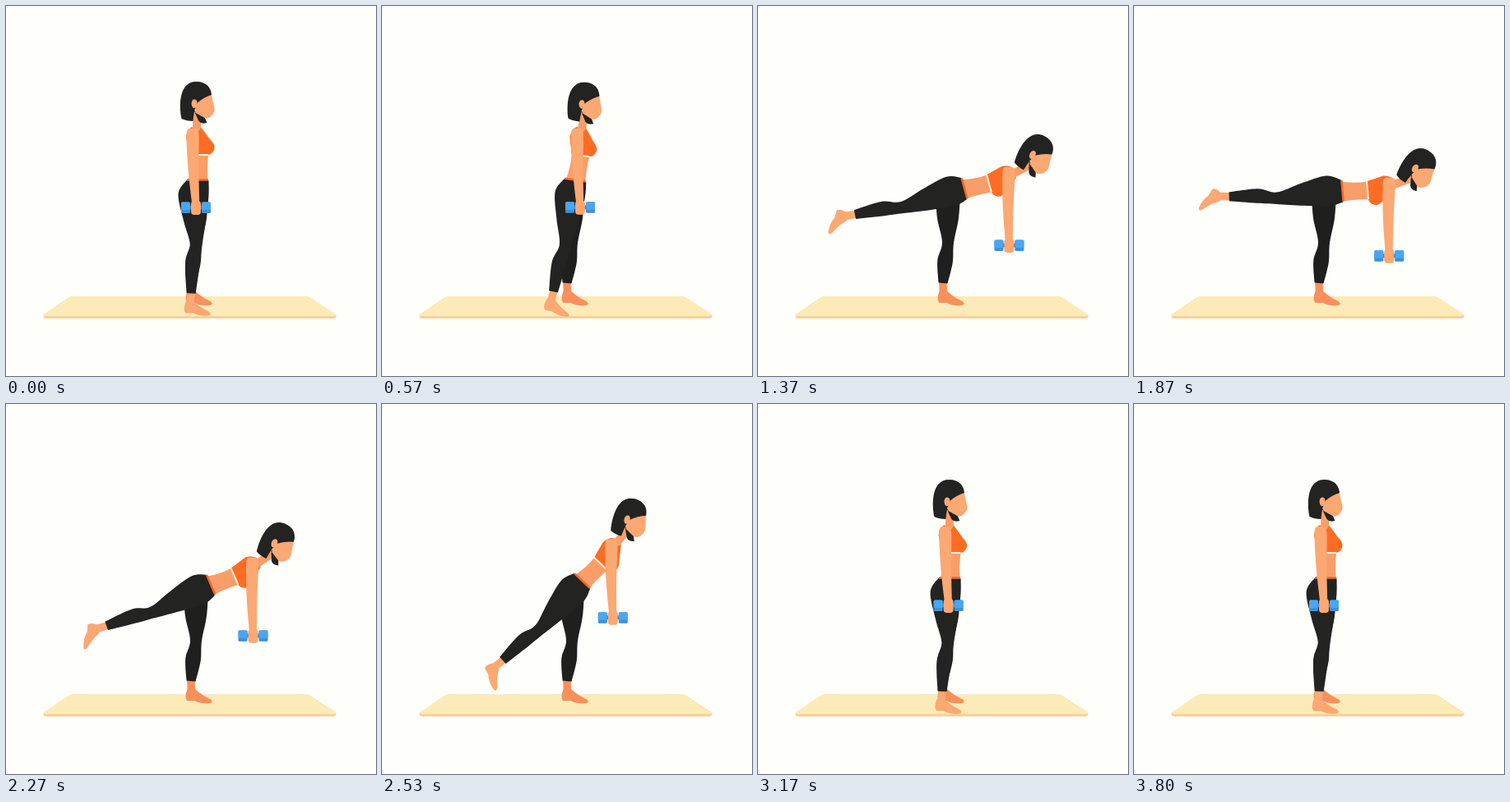
An HTML page with a canvas that plays this animation: 450 px wide and 450 px high, repeating every 3830 ms.

```html
<!DOCTYPE html>
<html lang="en">
<head>
<meta charset="utf-8">
<title>Single-leg deadlift</title>
<style>
html, body { margin: 0; width: 100%; height: 100%; overflow: hidden; background: #fefefb; }
canvas { display: block; width: 450px; height: 450px; }
</style>
</head>
<body>
<canvas id="stage" width="450" height="450"></canvas>
<script>
const ctx = document.getElementById('stage').getContext('2d');
const LOOP = 3830, START = 288, MOVE = 1400, MIRROR = 3530; // the way back mirrors the way down
const PAPER = '#fefefb', MAT = '#fcebb8', MAT_EDGE = '#fad09a';
const SKIN = '#fba873', SHADE = '#f99e69', FAR_SKIN = '#f8905c';
const PANTS = '#232322', FAR_PANTS = '#1f1f1e', HAIR = '#232322', TOP = '#fe6c24', BAND = '#f4652a';

const rad = degrees => degrees * Math.PI / 180;
const mix = (a, b, u) => a + (b - a) * u;
const between = (a, b, u) => [mix(a[0], b[0], u), mix(a[1], b[1], u)];

// Point at a distance below another, swung backwards by an angle
const hang = ([x, y], degrees, length) =>
  [x - length * Math.sin(rad(degrees)), y + length * Math.cos(rad(degrees))];

// Point given in a turned frame
function place([ox, oy], degrees, x, y) {
  const c = Math.cos(rad(degrees)), s = Math.sin(rad(degrees));
  return [ox + x * c - y * s, oy + x * s + y * c];
}

// 0 upright, 1 level
function leanAt(time) {
  const u = (Math.min(time, MIRROR - time) - START) / MOVE;
  return (1 - Math.cos(Math.PI * Math.max(0, Math.min(1, u)))) / 2;
}

function fill(path, color) {
  ctx.fillStyle = color;
  ctx.fill(new Path2D(path));
}

function line(a, b, width, color) {
  ctx.strokeStyle = color;
  ctx.lineWidth = width;
  ctx.beginPath();
  ctx.moveTo(...a);
  ctx.lineTo(...b);
  ctx.stroke();
}

function box(x, y, w, h, r, color) {
  ctx.fillStyle = color;
  ctx.beginPath();
  ctx.roundRect(x, y, w, h, r);
  ctx.fill();
}

function at([x, y], degrees, draw) {
  ctx.save();
  ctx.translate(x, y);
  ctx.rotate(rad(degrees));
  draw();
  ctx.restore();
}

function curve(points) {
  for (let i = 0; i < points.length - 1; i++) {
    const p = points[i], q = points[i + 1];
    const o = points[i - 1] || p, r = points[i + 2] || q;
    ctx.bezierCurveTo(p[0] + (q[0] - o[0]) / 6, p[1] + (q[1] - o[1]) / 6,
      q[0] - (r[0] - p[0]) / 6, q[1] - (r[1] - p[1]) / 6, q[0], q[1]);
  }
}

// Limb of changing half width along [x, y, half] joints
function limb(joints, color, startTurn) {
  const front = [], back = [];
  joints.forEach(([x, y, half], i) => {
    const a = joints[i - 1] || joints[i], b = joints[i + 1] || joints[i];
    let angle = Math.atan2(b[1] - a[1], b[0] - a[0]) - Math.PI / 2;
    if (i === 0 && startTurn !== undefined) angle = rad(startTurn);
    const nx = Math.cos(angle) * half, ny = Math.sin(angle) * half;
    front.push([x + nx, y + ny]);
    back.unshift([x - nx, y - ny]);
  });
  ctx.fillStyle = color;
  ctx.beginPath();
  ctx.moveTo(...front[0]);
  curve(front);
  ctx.lineTo(...back[0]);
  curve(back);
  ctx.closePath();
  ctx.fill();
}

function foot(cuff, ankle, turn, color) {
  line(between(cuff, ankle, -0.2), ankle, 9.5, color);
  at(ankle, turn, () =>
    fill('M-5-5Q0-9 5-5Q12 2 23 7Q28 11 22 12Q12 13 4 9L-5 9Q-9 5-5-5Z', color));
}

function mat() {
  fill('M82 353H362Q367 353 370 355L401 375Q403 380 398 380H49Q44 380 46 375L76 355Q79 353 82 353Z', MAT_EDGE);
  fill('M82 353H362Q367 353 370 355L401 375Q402 377 398 377H49Q45 377 46 375L76 355Q79 353 82 353Z', MAT);
}

function farLeg() {
  foot([225, 337], [225.5, 352], 0, FAR_SKIN);
  limb([[231, 228, 15], [231, 258, 13], [231, 288, 7], [227.5, 311, 9.3], [225, 337, 5.5]], FAR_PANTS);
}

function nearLeg(waist, turn, hip, lean) {
  const shin = 6 + 86 * lean;
  const knee = hang(hip, 85 * lean - 3, 62);
  const cuff = hang(knee, shin, 58);
  foot(cuff, hang(knee, shin, 73), 120 * lean, SKIN);
  limb([
    [...waist, 13.5],
    [...hip, 18.5],
    [...between(hip, knee, 0.5), 13.5],
    [...knee, 7.2],
    [...place(between(knee, cuff, 0.4), shin, -2, 0), 8.8],
    [...cuff, 5.5]
  ], PANTS, turn);
}

function torso() {
  fill('M-12 4Q-7-18-9-32L-14-52Q-13-63-4-65L4-65Q10-58 13-50L13-30Q11-14 13 4Z', SHADE);
  fill('M-9-31L-14-52Q-13-62-7-65Q0-54 4-64Q10-57 15-50Q23-42 20-37Q18-32 13-31Z', TOP);
  line([-9, -31], [13, -31], 2, '#fff0dc');
}

function head() {
  fill('M0 9L13 17L16 24Q9 26 6 22Z', HAIR);
  fill('M0-9L21-12Q23-2 25 6Q26 11 21 16Q17 20 13 18L2 12Z', SKIN);
  fill('M-15 19C-18 5-19-26 3-26C16-26 21-18 21.5-10Q12-7 4 0Q0 8-1 22Q-9 22-15 19Z', HAIR);
  fill('M-3 1C-3-6 4-6 4 0C4 7-2 9-3 1Z', SKIN);
}

function dumbbell() {
  line([-9, 0], [9, 0], 5, '#3478b5');
  for (const x of [-18, 7]) {
    box(x, -6.5, 11, 13.5, 1.5, '#3a91dd');
    box(x, -6.5, 11, 9.5, 1.5, '#4ba6f0');
  }
  box(-6, -8, 12, 17, 4, SKIN);
}

function arm(shoulder, hand) {
  const [x, y] = shoulder;
  const elbow = between(shoulder, hand, 0.5);
  limb([[x, y - 5, 4.5], [x, y + 3, 7.5], [elbow[0] - 1, elbow[1], 6.3], [...between(shoulder, hand, 0.95), 4.5]], SKIN);
}

function draw(time) {
  const lean = leanAt(time), turn = 85 * lean, nod = 30 * lean;
  const waist = [233 + 20 * lean, 212 + 13 * lean * lean];
  const hip = [228 + 7 * lean, 230 - 5 * lean];
  const shoulder = place(waist, turn, -6, -58);
  const hand = [shoulder[0] + 4 - 4 * lean, shoulder[1] + 91 - lean];
  const ear = place(waist, turn, -4.5 - 16 * lean, -94 + 3 * lean);

  ctx.fillStyle = PAPER;
  ctx.fillRect(0, 0, 450, 450);
  mat();
  farLeg();
  line(place(waist, turn, -1, -59), place(ear, nod, 4, 12), 10, SHADE);
  at(waist, turn, torso);
  nearLeg(waist, turn, hip, lean);
  at(waist, turn, () => line([-13, -0.5], [13, -0.5], 2.5, BAND));
  at(ear, nod, head);
  arm(shoulder, hand);
  at(hand, 0, dumbbell);
}

function frame(now) {
  draw(now % LOOP);
  requestAnimationFrame(frame);
}
draw(0);
requestAnimationFrame(frame);
</script>
</body>
</html>
```
